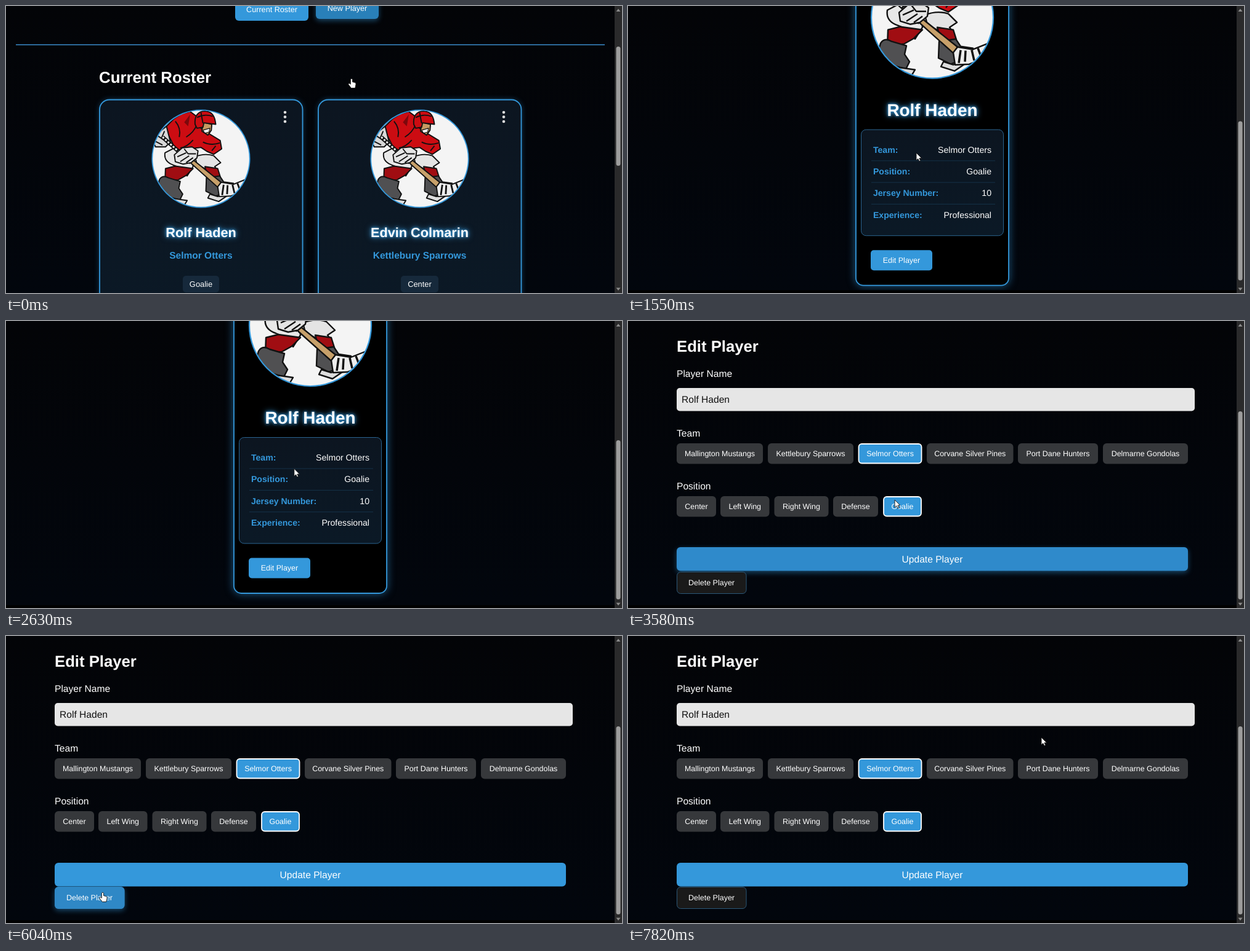
An HTML page for the animation above (8 s loop, 1000 px wide and 467 px high).

```html
<!DOCTYPE html>
<html lang="en">
<head>
<meta charset="utf-8">
<title>Team roster</title>
<style>
  html, body { margin: 0; width: 100%; height: 100%; overflow: hidden; background: #030408; }
  svg { display: block; width: 1000px; height: 467px; }
  text { font-family: "Liberation Sans", Arial, sans-serif; fill: #fff; text-rendering: geometricPrecision; white-space: pre; }
  .b { font-weight: bold; }
  .mid { text-anchor: middle; }
  .end { text-anchor: end; }
  .blue { fill: #3498db; }
  .dark { fill: #111; }
  .halo { filter: drop-shadow(0 0 2px #3498db) drop-shadow(0 0 5px #3498dbb0); }
  .glow { filter: drop-shadow(0 0 7px #3498db90); }
  .soft { filter: drop-shadow(0 0 4px #3498db50); }
  .lift { filter: drop-shadow(0 3px 4px #3498db70); }
</style>
</head>
<body>
<svg id="stage" viewBox="0 0 1000 467">
  <defs>
    <linearGradient id="back" x2="0" y2="1">
      <stop stop-color="#030407"/><stop offset="1" stop-color="#02060d"/>
    </linearGradient>
    <linearGradient id="panel" x2="0" y2="1">
      <stop stop-color="#0c1520"/><stop offset="1" stop-color="#0b1926"/>
    </linearGradient>
    <clipPath id="disc"><circle cx="100" cy="100" r="99"/></clipPath>
    <g id="avatar">
      <circle cx="100" cy="100" r="99" fill="#f4f4f4"/>
      <g id="skater" clip-path="url(#disc)" stroke="#111" stroke-width="2.4" stroke-linejoin="round"></g>
      <circle cx="100" cy="100" r="99" fill="none" stroke="#3498db" stroke-width="2.2"/>
    </g>
  </defs>
  <rect width="1000" height="467" fill="url(#back)"/>
  <g id="roster"></g>
  <g id="detail"></g>
  <g id="edit"></g>
  <g id="bar"></g>
  <g id="cursor" stroke="#111" stroke-width=".9" fill="#fff" stroke-linejoin="round">
    <path id="arrow" d="M0 0V12.2L2.8 9.6 4.8 13.6 6.8 12.7 4.9 8.8H8.8Z"/>
    <path id="hand" d="M-1.7 1.4Q0-1.2 1.5 1.4V5.6L5.6 6.6Q7.3 7.2 7 9.6L5.8 15.6H-.6L-5.2 9.6Q-5.2 7.2-3.2 8L-1.7 9.4Z"/>
  </g>
</svg>
<script>
const $ = id => document.getElementById(id);
const BLUE = '#3498db', GREY = '#36383b';

const text = (x, y, size, str, cls = '') =>
  `<text x="${x}" y="${y}" font-size="${size}" class="${cls}">${str}</text>`;
const box = (x, y, w, h, r, fill, more = '') =>
  `<rect x="${x}" y="${y}" width="${w}" height="${h}" rx="${r}" fill="${fill}" ${more}/>`;
const shape = (fill, d, more = '') => `<path fill="${fill}" d="${d}" ${more}/>`;
const avatar = (x, y, k) => `<use href="#avatar" transform="translate(${x} ${y}) scale(${k}) translate(-100 -100)"/>`;

// Hockey player, drawn inside a 200 x 200 square
$('skater').innerHTML = [
  // right leg
  shape('#e4e4e4', 'M88 96Q108 88 126 94L140 108 128 116 134 124 112 122 92 112Z'),
  shape('#a00d12', 'M108 116L134 120 139 136 116 143Z'),
  shape('#505052', 'M111 139L138 135 146 147 166 150 164 162 130 176 110 166Z'),
  shape('#ddd', 'M118 172L114 180 136 187 158 172 150 168 134 177Z'),
  // left leg
  shape('#e8e8e8', 'M27 88Q24 106 44 113L66 122 72 135 84 116 80 84 50 76Z'),
  shape('#a00d12', 'M28 120L48 115 84 120 70 134 54 143 27 146Z'),
  shape('#505052', 'M16 142Q22 132 34 139L58 146 55 160 63 172 57 184 30 176 8 168Z'),
  shape('#ddd', 'M24 178L72 185 66 195 30 192Z'),
  // jersey and sleeves
  shape('#cc0c12', 'M60 9L78 4 94 16 100 38 118 50 139 63 142 80 126 91 112 85 100 77 84 79 66 88 46 76 34 52 30 34 46 18Z'),
  shape('none', 'M48 24Q60 38 56 56M92 30Q86 46 70 56M138 68Q120 74 104 66M58 78Q72 76 84 62M122 84L130 74'),
  shape('#7d080c', 'M66 26L78 10 74 34Z', 'stroke="none"'),
  // upper glove
  shape('#d8d8d8', 'M30 34L34 50 38 66 28 76 8 76 2 64 12 48Z'),
  shape('none', 'M10 52L28 64M6 64L22 72M26 44L20 58'),
  // head
  shape('#c69a62', 'M104 26L122 30 121 42 114 52 102 44Z'),
  shape('#fff', 'M104 42L118 38 116 46 108 48Z', 'stroke-width="1.4"'),
  shape('#cc0c12', 'M88 30Q86 4 108 3 126 4 129 24L130 30 106 27 104 36 92 38Z'),
  shape('none', 'M92 16Q108 8 124 14M100 6L104 28'),
  // stick
  shape('none', 'M22 56L80 108', 'stroke-width="8"'),
  shape('none', 'M22 56L80 108', 'stroke="#eee" stroke-width="3.6" stroke-dasharray="4 3"'),
  shape('#c7a06a', 'M74 104L80 99 141 148 134 158Z'),
  shape('#eee', 'M134 157L141 148 166 152 196 140 196 162 160 176 137 177Z'),
  shape('none', 'M146 153L143 174M154 154L153 172M164 153L168 170M174 150L180 166', 'stroke-width="3.5"'),
  // lower gloves
  shape('#e4e4e4', 'M46 92L62 78 82 76 94 84 92 98 80 108 64 111 48 106Z'),
  shape('none', 'M52 96L70 88M58 106L76 94M70 108L84 98M66 80L74 90 90 90')
].join('');

const KEEPER = 'Rolf Haden', CLUB = 'Selmor Otters', RIVAL = 'Kettlebury Sparrows';

function card(x, name, team, role, roleWidth) {
  const mid = x + 165.5;
  return box(x + 1, 152.5, 329.5, 349, 16, 'url(#panel)', `stroke="${BLUE}" stroke-width="1.8" class="soft"`) +
    avatar(mid, 248.5, .8) +
    [173, 180.5, 188].map(y => `<circle cx="${x + 302}" cy="${y}" r="2.3" fill="#ddd"/>`).join('') +
    text(mid, 376, 21.7, name, 'b mid halo') +
    text(mid, 411, 15.5, team, 'b mid blue') +
    box(mid - roleWidth / 2, 439, roleWidth, 27, 5, '#16293b') +
    text(mid, 457, 12.9, role, 'mid');
}

$('roster').innerHTML =
  box(372, -9, 119, 33, 6, BLUE) + text(431.5, 10, 12.65, 'Current Roster', 'mid') +
  box(503, -12, 102, 33, 6, '#2980b9', 'class="lift"') + text(554, 8, 12.65, 'New Player', 'mid') +
  box(16, 62.3, 956, 1.5, 0, '#3a8cca') +
  text(151, 124.5, 25.8, 'Current Roster', 'b') +
  `<g id="row">${card(151, KEEPER, CLUB, 'Goalie', 59) + card(506, 'Edvin Colmarin', RIVAL, 'Center', 61)}</g>` +
  '<use href="#row" y="374"/>';

const facts = [['Team:', CLUB], ['Position:', 'Goalie'], ['Jersey Number:', '10'], ['Experience:', 'Professional']];
$('detail').innerHTML =
  box(370, -105, 248, 559, 12, '#000', `stroke="${BLUE}" stroke-width="1.8" class="glow"`) +
  avatar(494, 18, 1) +
  text(494, 178, 27.9, KEEPER, 'b mid halo') +
  box(378.5, 200.5, 231, 172.5, 8, 'url(#panel)', 'stroke="#2a6490"') +
  facts.map(([label, value], i) => {
    const y = 238 + i * 35.3;
    return text(398, y, 14.05, label, 'b blue') + text(590, y, 14.1, value, 'end') +
      (i < 3 ? box(395, y + 12.6, 201, 1, 0, '#3498db33') : '');
  }).join('') +
  box(394, 396.5, 100, 33, 5, BLUE, 'id="editButton"') +
  text(444, 417, 12.5, 'Edit Player', 'mid');

const choices = (y, list, chosen) => list.map(([x, w, label], i) =>
  (i === chosen
    ? box(x + 1, y + 1, w - 2, 31.5, 5, BLUE, 'stroke="#fff" stroke-width="1.8"')
    : box(x, y, w, 33.5, 6, GREY)) +
  text(x + w / 2, y + 21, 12.45, label, 'mid')).join('');

$('edit').innerHTML =
  text(79, 50, 25.7, 'Edit Player', 'b') +
  text(79, 91, 15.6, 'Player Name') +
  box(79, 109, 841, 37.5, 5, '#e6e6e6') + text(87, 133, 15.6, KEEPER, 'dark') +
  text(79, 188, 15.6, 'Team') +
  choices(199, [
    [79, 140, 'Mallington Mustangs'], [227, 139, RIVAL], [373.5, 104, CLUB],
    [485, 140.5, 'Corvane Silver Pines'], [633, 130, 'Port Dane Hunters'], [771, 138, 'Delmarne Gondolas']
  ], 2) +
  text(79, 274, 15.6, 'Position') +
  choices(285, [
    [79, 64, 'Center'], [150, 79.5, 'Left Wing'], [237.5, 88, 'Right Wing'], [333, 73, 'Defense'], [414, 63, 'Goalie']
  ], 4) +
  `<g id="update">${box(79, 369, 830, 38.5, 6, BLUE) + text(494, 394, 15.6, 'Update Player', 'mid')}</g>` +
  box(79.5, 408.5, 112.5, 35, 6, '#1a1a1a', 'stroke="#2b5878"') +
  box(79, 408, 113.5, 36, 6, '#2f88c6', 'id="deleteHover" class="lift"') +
  text(135.5, 430, 12.5, 'Delete Player', 'mid');

$('bar').innerHTML =
  box(0, 462.5, 988, 5, 0, '#000', 'id="foot"') +
  box(988, 0, 12, 467, 0, '#2a2a2b') +
  shape('#8c8c8c', 'M990.5 9L994 4.5 997.5 9ZM990.5 458.5L994 463 997.5 458.5Z') +
  box(990.5, 0, 7, 0, 3.5, '#9d9d9d', 'id="thumb"');

const ramp = (t, a, b) => Math.min(1, Math.max(0, (t - a) / (b - a)));
const smooth = (t, a, b) => { const p = ramp(t, a, b); return p * p * (3 - 2 * p); };
const pulse = (t, a, b, c, d) => ramp(t, a, b) - ramp(t, c, d);

// Pointer moves: start, end, x, y
const moves = [
  [120, 310, 468, 239], [2630, 2980, 446, 395], [3460, 3960, 423, 211],
  [4210, 4990, 430, 300], [5630, 6040, 157, 417], [6520, 6890, 330, 340], [7490, 7820, 671, 165]
];
const handTimes = [[0, 830], [2900, 3490], [3850, 4280], [4900, 5660], [5980, 6550]];

function pointer(t) {
  let x = 561, y = 118;
  for (const [a, b, toX, toY] of moves) {
    const p = 1 - (1 - ramp(t, a, b)) ** 3;
    x += (toX - x) * p;
    y += (toY - y) * p;
  }
  return [x, y];
}

const show = (id, on) => $(id).setAttribute('visibility', on ? 'visible' : 'hidden');
const shift = (id, x, y) => $(id).setAttribute('transform', `translate(${x} ${y})`);

function draw(t) {
  const page = t < 830 ? 'roster' : t < 3240 ? 'detail' : 'edit';
  for (const id of ['roster', 'detail', 'edit']) $(id).style.display = id === page ? '' : 'none';
  show('foot', page !== 'roster');

  const list = 130 + 210 * smooth(t, 120, 310);
  const card = 332 - 123.5 * smooth(t, 1462, 1930) + 61.5 * smooth(t, 2090, 2160) + 62 * smooth(t, 2290, 2370);
  shift('roster', 0, 130 - list);
  shift('detail', 0, 321 - card);
  const [top, height] = { roster: [12 + list * .416, 194], detail: [12 + card * .548, 259], edit: [147, 306] }[page];
  $('thumb').setAttribute('y', top);
  $('thumb').setAttribute('height', height);

  $('editButton').setAttribute('fill', t > 2940 ? '#2980b9' : BLUE);
  const over = 1 - ramp(t, 3580, 3720);
  shift('update', 0, -over);
  $('update').firstChild.setAttribute('fill', over > .5 ? '#2f8acb' : BLUE);
  $('update').firstChild.setAttribute('class', over > .5 ? 'lift' : '');
  $('deleteHover').setAttribute('opacity', pulse(t, 5940, 6040, 6540, 6740));

  const hand = handTimes.some(([a, b]) => t >= a && t < b);
  show('hand', hand);
  show('arrow', !hand);
  shift('cursor', ...pointer(t));
}

const start = performance.now();
(function tick() {
  draw((performance.now() - start) % 8000);
  requestAnimationFrame(tick);
})();
</script>
</body>
</html>
```
